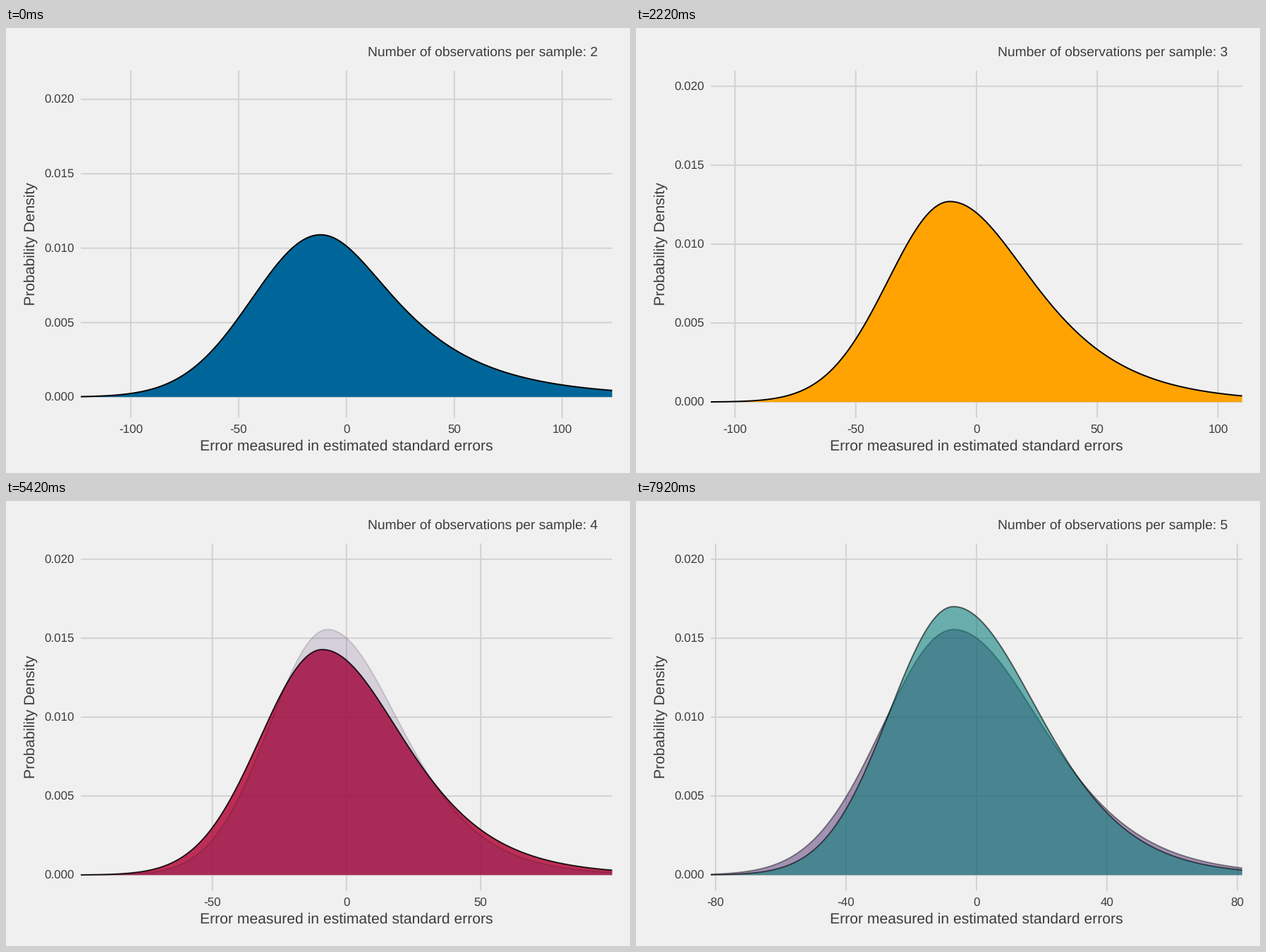
A matplotlib script for the animation above (8000 ms loop, 885 by 632 pixels).

```python
import numpy as np
import matplotlib.pyplot as plt
from matplotlib.animation import FuncAnimation

plt.rcParams.update({
    "font.family": "Liberation Sans",
    "text.hinting": "none",
    "path.snap": False,
})

W, H, DPI = 885, 632, 100
PX = 72 / DPI                       # points per pixel
LEFT, RIGHT, TOP, BOTTOM = 106.1, 859.7, 60.3, 553.6
MID = (LEFT + RIGHT) / 2
INK, GRID, PAPER = "#3C3C3C", "#D2D2D2", "#F0F0F0"

STEP_MS = 8000 / 57.6               # the picture advances in discrete steps
INTERVAL, FRAMES = 40, 200

# Each sample size: colour, peak (1e-4), mode, left and right spread
CURVES = {
    2: ("#006699", 109, -12, 31.8, 31),
    3: ("#FFA303", 127, -11, 25.6, 32),
    4: ("#B40E3D", 142.8, -9, 23.2, 28.7),
    5: ("#3B125F", 155.5, -7, 21.8, 26.3),
    6: ("#057D79", 170, -7, 19.7, 25.3),
}
STARTS = [int(7.7 + 15.3 * k) for k in range(-1, 5)]   # steps where a change begins
REST = 8                                               # still steps between fades
ZOOM = 8                                               # steps one zoom takes
LIMITS = [71, 119, 100, 90, 75, 72]                    # half-width of the x view


def clamp(u):
    return min(max(u, 0.0), 1.0)


def ease(u):
    return (1 - np.cos(np.pi * clamp(u))) / 2


def density(n, x):
    """Bell curve whose right tail stretches out, less so as n grows."""
    _, peak, mode, left, right = CURVES[n]
    z = np.linspace(-5, 5, 600)
    tail = 9.2 * n ** -1.4
    spread = np.where(z < 0, left * z, right * z + tail * z ** 3)
    return np.interp(x, mode + spread, peak * np.exp(-z ** 2 / 2))


def view(t):
    """Half-width of x and bottom and top of y, with 5 % padding."""
    moved = [ease((t - s - 1) / ZOOM) for s in STARTS[:-1]]
    half = 1.1 * (LIMITS[0] + np.dot(np.diff(LIMITS), moved))
    rest = 1 - moved[0]
    low, high = -23 * rest, 200 + 60 * rest
    pad = 0.05 * (high - low)
    return half, low - pad, high + pad


def layers(t):
    """Sample size and opacity of the outgoing and the incoming curve."""
    k = max(1, sum(t > s for s in STARTS) - 1)
    length = STARTS[k + 1] - STARTS[k] - REST
    p = clamp((t - STARTS[k]) / length)
    return (k + 1, 1 - p), (k + 2, p)


fig = plt.figure(figsize=(W / DPI, H / DPI), dpi=DPI, facecolor=PAPER)
ax = fig.add_axes([0, 0, 1, 1])
ax.set_xlim(0, W)
ax.set_ylim(H, 0)
ax.axis("off")


def label(x, y, text, size, ha="center", **kw):
    return ax.text(x, y, text, size=size * PX, color=INK, ha=ha,
                   va="baseline", **kw)


def stroke(color, z):
    return ax.plot([], [], color=color, lw=1.95 * PX, zorder=z,
                   solid_capstyle="butt")[0]


label(MID, 599.8, "Error measured in estimated standard errors", 21.2)
label(41, 307, "Probability Density", 21.2, rotation=90, rotation_mode="anchor")
title = label(839, 39.9, "", 19.23, ha="right")

x_marks = [(k, stroke(GRID, 1), label(0, 575.4, "", 16.95)) for k in range(-2, 3)]
y_marks = [(v, stroke(GRID, 1), label(97.3, 0, f"{v / 1e4:.3f}", 16.95, ha="right"))
           for v in range(0, 201, 50)]
shapes = [(ax.fill([0, 0, 0], [0, 0, 0], lw=0, zorder=z)[0], stroke("black", z + 1))
          for z in (3, 5)]


def draw(i):
    t = int((i * INTERVAL + 30) / STEP_MS)
    half, low, high = view(t)

    def px(x):
        return MID + x / half * (RIGHT - LEFT) / 2

    def py(y):
        return BOTTOM - (y - low) / (high - low) * (BOTTOM - TOP)

    gap = 50 if half > 84 else 40
    for k, line, text in x_marks:
        x = px(k * gap)
        line.set_data([x, x], [TOP, BOTTOM])
        text.set_x(x)
        text.set_text(str(k * gap))
        for part in (line, text):
            part.set_visible(abs(k * gap) <= half)
    for v, line, text in y_marks:
        line.set_data([LEFT, RIGHT], [py(v)] * 2)
        text.set_y(py(v) + 6)

    xs = np.linspace(-half, half, 420)
    base = py(0)
    for (fill, line), (n, alpha) in zip(shapes, layers(t)):
        x, y = px(xs), py(density(n, xs))
        fill.set_xy(np.c_[np.r_[x, RIGHT, LEFT], np.r_[y, base, base]])
        fill.set_facecolor(CURVES[n][0])
        line.set_data(x, y)
        for part in (fill, line):
            part.set_alpha(alpha)
            part.set_visible(alpha > 0)

    count = 2 + sum(t >= s + 5 for s in STARTS[1:])
    title.set_text(f"Number of observations per sample: {count}")
    return []


anim = FuncAnimation(fig, draw, frames=FRAMES, interval=INTERVAL,
                     repeat=True, repeat_delay=0, blit=False)
plt.show()
```
